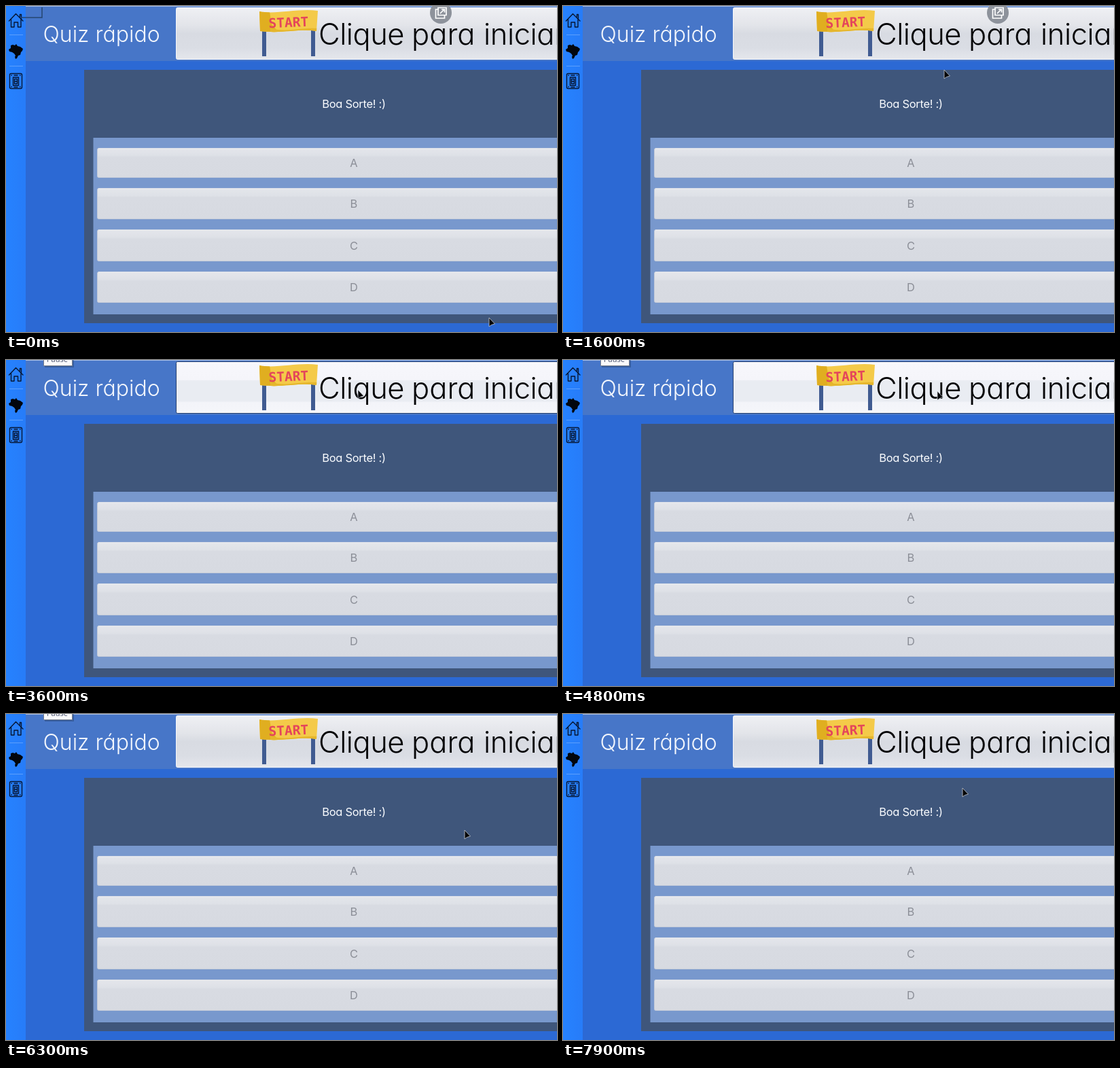
These frames come from a looping animation (811x480 px, 8 s). An HTML page:

```html
<!DOCTYPE html>
<html lang="pt-BR">
<head>
<meta charset="utf-8">
<title>Quiz rápido</title>
<style>
html, body { margin: 0; width: 100%; height: 100%; overflow: hidden; background: #2c69d4; }
svg { display: block; width: 811px; height: 480px; }
text { font-family: Inter, Lato, sans-serif; font-feature-settings: "cv11"; }
.big { font-size: 43.5px; font-weight: 300; fill: #050507; }
.title { font-size: 32px; font-weight: 300; fill: #f2f6fd; }
.note { font-size: 16.5px; letter-spacing: -.3px; fill: #fafcff; text-anchor: middle; }
.answer { font-size: 16.5px; fill: #8b8e97; text-anchor: middle; }
.sign { font: bold 19.5px "DejaVu Sans Mono", monospace; fill: #e4455b; }
.tip { font: 11px "Open Sans", sans-serif; fill: #46506e; }
.line { fill: none; stroke: #071631; stroke-width: 1.4; stroke-linejoin: round; stroke-linecap: round; }
</style>
</head>
<body>
<svg viewBox="0 0 811 480">
  <defs>
    <linearGradient id="side"><stop stop-color="#2682ff"/><stop offset="1" stop-color="#277cf8"/></linearGradient>
    <linearGradient id="answer" x2="0" y2="1">
      <stop stop-color="#e4e6eb"/><stop offset=".24" stop-color="#dee1e7"/>
      <stop offset=".3" stop-color="#d8dbe2"/><stop offset="1" stop-color="#d7dae1"/>
    </linearGradient>
    <linearGradient id="normal" x2="0" y2="1">
      <stop stop-color="#eff0f4"/><stop offset=".35" stop-color="#e2e4e9"/><stop offset=".5" stop-color="#d8dbe2"/>
      <stop offset=".78" stop-color="#dadde4"/><stop offset="1" stop-color="#e5e7ec"/>
    </linearGradient>
    <linearGradient id="hover" x2="0" y2="1">
      <stop stop-color="#f7f7fc"/><stop offset=".35" stop-color="#f5f5fa"/><stop offset=".37" stop-color="#e9ecf2"/>
      <stop offset=".76" stop-color="#e9ecf2"/><stop offset=".79" stop-color="#f3f4f9"/><stop offset="1" stop-color="#f5f6fa"/>
    </linearGradient>
    <linearGradient id="pressed" x2="0" y2="1">
      <stop stop-color="#b9bdc9"/><stop offset=".3" stop-color="#b1b5c2"/><stop offset=".5" stop-color="#a6abb9"/>
      <stop offset=".78" stop-color="#a9aebc"/><stop offset="1" stop-color="#b4b8c5"/>
    </linearGradient>
    <clipPath id="cloth"><path d="M373 8C397 13 430 3 459 7L457 37C432 33 408 41 374 37Z"/></clipPath>
  </defs>

  <rect width="811" height="480" fill="#2c69d4"/>
  <rect x="29" width="782" height="81" fill="#4776c8"/>
  <rect x="29" width="782" height="1" fill="#a9c0e8"/>
  <rect width="29" height="480" fill="url(#side)"/>
  <path d="M5 42.5H25M5 88.5H25" stroke="#5c9ffc"/>

  <path class="line" d="M4.5 22L14.5 11.5L25 22M7.5 20V31H12V24H17.500V31H22V20M20.500 16V12.500H22.500V18.500"/>
  <path d="M10 57L13 58L15 56L17 59L21 60L25 63L24 66L22 68L21 72L18 73L16 77L14 78L13 75L14 73L12 70L9 68L5 67L4 64L7 62L7 58Z" fill="#02060d"/>
  <rect class="line" x="5.500" y="99.500" width="18" height="22" rx="2"/>
  <path class="line" d="M10.500 105H18.500V117H10.500ZM12.500 107.500H16.500V111H12.500ZM12.500 111V114.500H16.500V111M12 102H17M12 119.500H17"/>
  <path d="M7.500 102H9M20 102H21.500M7.500 119H9M20 119H21.500" stroke="#071631" stroke-width="1.500"/>

  <text class="title" x="54.500" y="53">Quiz rápido</text>

  <rect id="start" x="250.500" y="2.500" width="580" height="76" rx="2"/>
  <path d="M377 34H383V74H377ZM449 34H455V74H449Z" fill="#405b91"/>
  <g clip-path="url(#cloth)">
    <rect x="370" y="2" width="92" height="40" fill="#f4ca49"/>
    <path d="M370 2H387L391 27L404 42H370Z" fill="#e0ae20"/>
    <path d="M389 32C410 40 432 31 460 33V42H389Z" fill="#e5b62c"/>
  </g>
  <text class="sign" x="386.500" y="31" transform="rotate(-2.5 416 24)">START</text>
  <g class="big">
    <text x="460" y="57" letter-spacing="-.5">Clique</text>
    <text x="597" y="57">para</text>
    <text x="703" y="57" letter-spacing="-.4">iniciar</text>
  </g>

  <rect x="115" y="94" width="696" height="373" fill="#3f567b"/>
  <rect x="128.500" y="194" width="683" height="260" fill="#7898cd"/>
  <text class="note" x="512" y="150">Boa Sorte! :)</text>
  <g id="answers"></g>

  <g id="popout">
    <circle cx="640" cy="10" r="16" fill="#8d929b"/>
    <path d="M637 5H632.500V18H645.500V14M636 2.500H648V13.500H636ZM639 11L645 5M641 5H645.500V9.500" fill="none" stroke="#fff" stroke-width="1.700"/>
  </g>
  <path id="shade" d="M22 17H53V2" fill="none" stroke="#26456f" stroke-width="1.500"/>
  <g id="tip">
    <rect x="57" y="0" width="43" height="11" fill="#24406f" opacity=".45"/>
    <path d="M55.500 -2V8.500H97.500V-2" fill="#fafafc" stroke="#777d8c"/>
    <text class="tip" x="60" y="3">Pause</text>
  </g>
  <path id="cursor" d="M0 0V13L3.500 10.500L8.500 9Z" fill="#050608" stroke="#c8ccd4" stroke-width=".8" stroke-linejoin="round"/>
</svg>
<script>
const LOOP = 8000, STEP = 100;
const $ = id => document.getElementById(id);

// time, x, y of the pointer tip
const path = [
  [0, 711, 459], [900, 640, 240], [1600, 561, 94], [2100, 528, 84], [2700, 473, 41],
  [3000, 473, 41], [3900, 540, 45], [4200, 540, 45], [4800, 551, 46], [5000, 551, 46],
  [5300, 549, 50], [5750, 549, 50], [6300, 675, 171], [7100, 640, 150], [7300, 640, 150], [7900, 588, 109], [8000, 588, 109]
];

$("answers").innerHTML = [["A", 209, 44], ["B", 268, 46], ["C", 329, 47], ["D", 391, 46]].map(([s, y, h]) =>
  `<rect x="134.500" y="${y + .5}" width="700" height="${h - 1}" rx="2" fill="url(#answer)" stroke="#c3cad8"/>
   <path d="M136 ${y + 1}H811" stroke="#eef0f4"/>
   <text class="answer" x="512" y="${y + h / 2 + 6}">${s}</text>`).join("");

function pointer(t) {
  let i = 0;
  while (i < path.length - 2 && t >= path[i + 1][0]) i++;
  const [t0, x0, y0] = path[i], [t1, x1, y1] = path[i + 1];
  const k = (t - t0) / (t1 - t0);
  return [x0 + (x1 - x0) * k, y0 + (y1 - y0) * k];
}

const show = (id, on) => $(id).setAttribute("visibility", on ? "visible" : "hidden");

function draw(now) {
  const t = Math.floor(now % LOOP / STEP) * STEP;
  const [x, y] = pointer(t);
  const state = t >= 5500 && t < 6000 ? "pressed" : x > 250 && y < 79 ? "hover" : "normal";
  $("cursor").setAttribute("transform", `translate(${Math.round(x)} ${Math.round(y)})`);
  $("start").setAttribute("fill", `url(#${state})`);
  $("start").setAttribute("stroke", state === "normal" ? "#f4f6fa" : state === "hover" ? "#26406f" : "#d3d8e4");
  show("shade", t < 500);
  show("popout", t < 2200);
  show("tip", t >= 3200 && t < 7500);
}

const begin = performance.now();
function tick() {
  draw(performance.now() - begin);
  requestAnimationFrame(tick);
}
tick();
</script>
</body>
</html>
```
